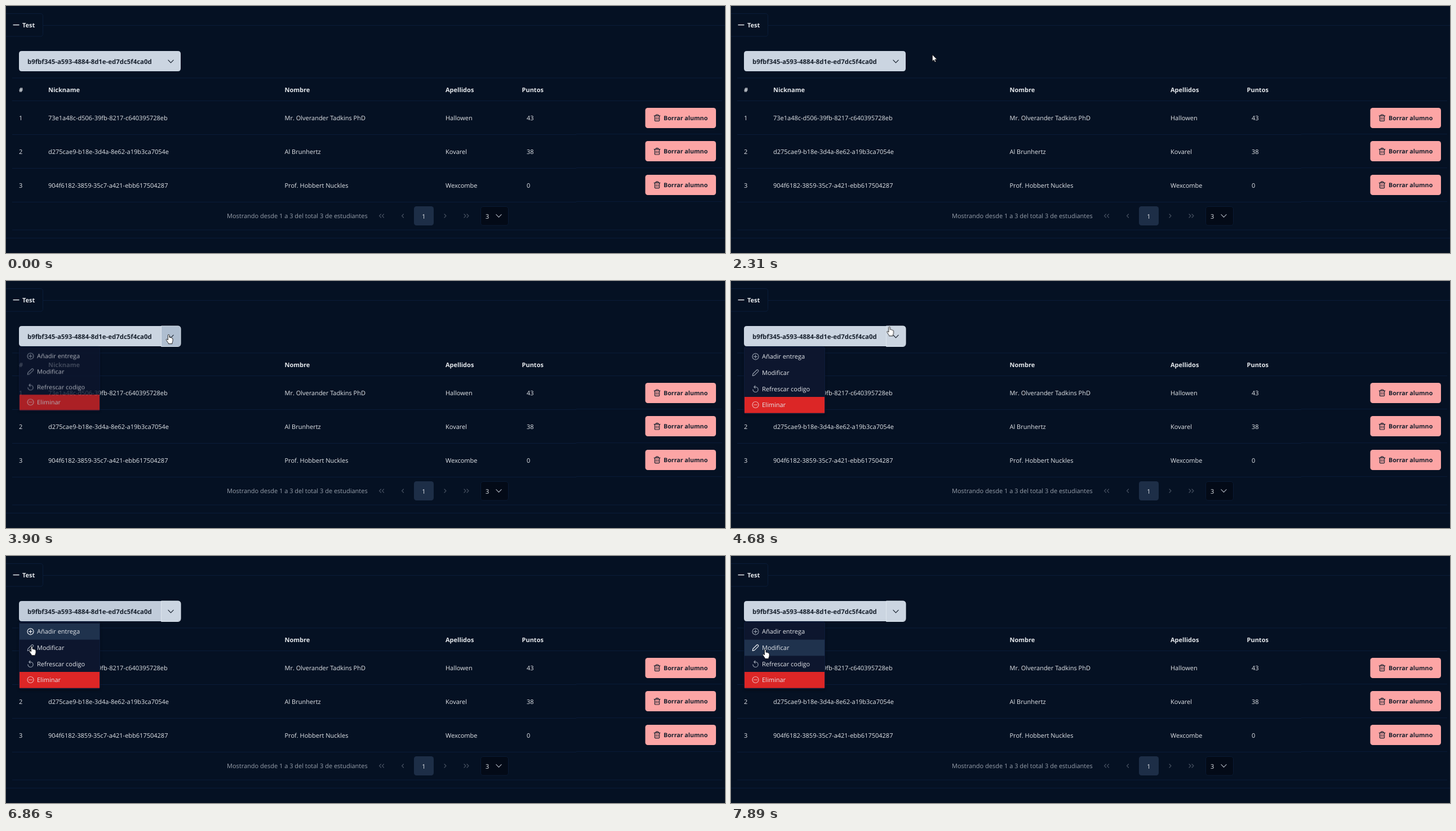
An HTML page for the animation above (7.99 s loop, 1276 by 439 pixels).

```html
<!DOCTYPE html>
<html lang="es">
<head>
<meta charset="utf-8">
<title>Test</title>
<style>
html, body { margin: 0; width: 100%; height: 100%; overflow: hidden; background: #051123; }
svg { display: block; width: 1276px; height: 439px; }
text { font: 11px "Open Sans", "Noto Sans", sans-serif; fill: #e4e7eb; text-rendering: geometricPrecision; white-space: pre; }
.b { font-weight: 700; }
.code { font-size: 11.4px; }
.action { font-size: 10.7px; }
.dark { fill: #17202d; }
.muted { fill: #979fab; }
.line { stroke: #0a1c39; fill: none; }
.icon { fill: none; stroke-width: 1.2; stroke-linecap: round; stroke-linejoin: round; }
.off { stroke: #465060; }
.ink { stroke: #17202d; }

.anim, .anim * { animation-duration: 7990ms; animation-iteration-count: infinite; animation-timing-function: linear; }
#cursor { animation-name: move; }
#arrow { animation-name: arrow; animation-timing-function: step-end; }
#hand { animation-name: hand; animation-timing-function: step-end; }
#ring { animation-name: ring; animation-timing-function: step-end; }
#main { animation-name: main; }
#drop { animation-name: drop; }
#menu { animation-name: menu; transform-origin: 95px 116px; }
#hi1 { animation-name: hi1; }
#hi2 { animation-name: hi2; }
#hi3 { animation-name: hi3; }

@keyframes move {
  0%, .25% { transform: translate(1268px, 434px); }
  2.5% { transform: translate(1120px, 370px); }
  5% { transform: translate(970px, 190px); }
  7.1% { transform: translate(870px, 50px); }
  9.64% { transform: translate(803px, 7px); }
  10.89% { transform: translate(757px, 8px); }
  15% { transform: translate(640px, 25px); }
  20.15% { transform: translate(487px, 65px); }
  25% { transform: translate(410px, 78px); }
  28.9% { transform: translate(357px, 86px); }
  31.04% { transform: translate(347px, 86px); }
  35% { transform: translate(325px, 89px); }
  38.8% { transform: translate(303px, 94px); }
  41.8%, 48.9% { transform: translate(289px, 95px); }
  51.8% { transform: translate(287px, 92px); }
  56.3% { transform: translate(276px, 84px); }
  61.8% { transform: translate(289px, 77px); }
  67.6% { transform: translate(245px, 73px); }
  72.6%, 73.8% { transform: translate(201px, 79px); }
  77.6% { transform: translate(130px, 95px); }
  82.6% { transform: translate(58px, 121px); }
  85.86% { transform: translate(46px, 160px); }
  89.5% { transform: translate(52px, 185px); }
  92.74% { transform: translate(60px, 183px); }
  96.4% { transform: translate(61px, 169px); }
  98.7%, 100% { transform: translate(61px, 166px); }
}
@keyframes arrow {
  0% { opacity: 0; }
  .25% { opacity: 1; }
  38.8% { opacity: 0; }
  59.5% { opacity: 1; }
  74% { opacity: 0; }
}
@keyframes hand {
  0% { opacity: 0; }
  38.8% { opacity: 1; }
  59.5% { opacity: 0; }
  74% { opacity: 1; }
}
@keyframes ring { 0% { opacity: 0; } 47.5%, 100% { opacity: 1; } }
@keyframes main {
  0%, 73.8% { fill: #cbd5e1; }
  76.3%, 83.5% { fill: #b2c0d0; }
  87.5%, 100% { fill: #cbd5e1; }
}
@keyframes drop {
  0%, 43% { fill: #cbd5e1; }
  45.5%, 49% { fill: #afbed0; }
  51.5%, 100% { fill: #cbd5e1; }
}
@keyframes menu {
  0%, 48.19% { opacity: 0; transform: scaleY(.8); animation-timing-function: cubic-bezier(0, 0, .2, 1); }
  49.69%, 100% { opacity: 1; transform: none; }
}
@keyframes hi1 {
  0%, 83.2% { opacity: 0; }
  84.5%, 86% { opacity: 1; }
  87.6%, 100% { opacity: 0; }
}
@keyframes hi2 {
  0%, 86% { opacity: 0; }
  87.6%, 88.6% { opacity: 1; }
  90.2%, 94% { opacity: 0; }
  96%, 100% { opacity: 1; }
}
@keyframes hi3 {
  0%, 88.6% { opacity: 0; }
  90.2%, 94% { opacity: 1; }
  96%, 100% { opacity: 0; }
}
</style>
</head>
<body>
<svg viewBox="0 0 1276 439" xmlns="http://www.w3.org/2000/svg">
  <defs>
    <path id="trash" class="icon ink" d="M-5.3-3.6H5.3M-4.1-3.6V4.6Q-4.1 5.7-3 5.7H3Q4.1 5.7 4.1 4.6V-3.6M-2.2-3.6V-4.8Q-2.2-5.7-1.3-5.7H1.3Q2.2-5.7 2.2-4.8V-3.6M-1.6-.8V3M1.6-.8V3"/>
    <path id="down" class="icon" d="M-4.6-2.3 0 2.3 4.6-2.3"/>
    <path id="left" class="icon" d="M1.5-3-1.5 0 1.5 3"/>
    <path id="plus" class="icon" d="M-5.5 0A5.5 5.5 0 1 1 5.5 0A5.5 5.5 0 1 1-5.5 0M-2.8 0H2.8M0-2.8V2.8"/>
    <path id="minus" class="icon" d="M-5.5 0A5.5 5.5 0 1 1 5.5 0A5.5 5.5 0 1 1-5.5 0M-2.8 0H2.8"/>
    <path id="pencil" class="icon" d="M-5.3 5.3-4.6 2 2.4-5Q3.4-5.8 4.4-4.9L4.9-4.4Q5.8-3.4 5-2.4L-2 4.6Z"/>
    <path id="refresh" class="icon" d="M-4.6 1.2A4.6 4.6 0 1 0 0-3.4H-2.4M-.6-5.6-2.8-3.4-.6-1.2"/>
    <filter id="shadow" x="-10%" y="-10%" width="120%" height="125%">
      <feDropShadow dx="0" dy="2" stdDeviation="2" flood-color="#000" flood-opacity=".35"/>
    </filter>
  </defs>

  <g class="line">
    <path d="M66 34.5H1276M0 412.5H1276"/>
    <path d="M0 13.5H61Q65.5 13.5 65.5 18V49.5Q65.5 54 61 54H0"/>
    <path d="M11 128H1271M11 168.5H1271M11 398H1271"/>
  </g>
  <path d="M12.5 33.6H23.5" stroke="#e4e7eb" stroke-width="1.5"/>
  <text class="b" x="29" y="38">Test</text>

  <text class="b" x="23" y="153">#</text>
  <text class="b" x="75" y="153">Nickname</text>
  <text class="b" x="494.5" y="153">Nombre</text>
  <text class="b" x="780" y="153">Apellidos</text>
  <text class="b" x="915.5" y="153">Puntos</text>
  <g id="rows"></g>

  <text class="muted" x="392" y="377">Mostrando desde 1 a 3 del total 3 de estudiantes</text>
  <g class="off">
    <use href="#left" x="664" y="373"/><use href="#left" x="669" y="373"/>
    <use href="#left" x="704" y="373"/>
    <use href="#left" transform="translate(779.5 373) scale(-1 1)"/>
    <use href="#left" transform="translate(814.5 373) scale(-1 1)"/>
    <use href="#left" transform="translate(819.5 373) scale(-1 1)"/>
  </g>
  <rect x="724" y="356" width="35" height="34" rx="4.5" fill="#1d2e47"/>
  <text x="741.5" y="377.5" text-anchor="middle">1</text>
  <rect x="842.5" y="356.5" width="49" height="33.5" rx="4.5" fill="#030a17" stroke="#0a1a33"/>
  <text x="851" y="378">3</text>
  <use href="#down" x="874.5" y="373" stroke="#aab2be"/>

  <g class="anim">
    <path id="main" d="M275 80V116H28Q23 116 23 111V85Q23 80 28 80Z"/>
    <path id="drop" d="M275 80H305Q310 80 310 85V111Q310 116 305 116H275Z"/>
    <path id="ring" d="M275.5 80H305Q310 80 310 85V111Q310 116.5 305 116.5H275.5Z" fill="none" stroke="#dde5ee"/>
    <text class="b dark code" x="38" y="102.5">b9fbf345-a593-4884-8d1e-ed7dc5f4ca0d</text>
    <use href="#down" class="ink" x="292.5" y="98.5"/>

    <g id="menu">
      <rect x="23.5" y="117" width="143" height="119" rx="3" fill="#07172f" stroke="#0a1c3a" filter="url(#shadow)"/>
      <rect x="24" y="206" width="142" height="28.7" fill="#dc2626"/>
      <g id="items"></g>
      <use href="#minus" x="43.5" y="220" stroke="#eeb0b0"/>
      <text x="55" y="224">Eliminar</text>
    </g>

    <g id="cursor">
      <path id="arrow" d="M.4.4V12.2L3.1 9.7 4.9 13.8 6.8 13 5 9H8.6Z" fill="#fff" stroke="#111" stroke-width=".8"/>
      <path id="hand" d="M-1.6 1.6Q-1.6.4-.3.4Q1 .4 1 1.6V5.2Q2.6 4.6 3.2 5.8Q4.7 5.2 5.2 6.5Q7 6.2 7 8V11.4Q7 13.2 5.9 14.4V16.6H-.8V15.4L-4.2 10.6Q-5.2 9-4.2 8.4Q-3.2 8-2.4 9L-1.6 10Z" fill="#fff" stroke="#111" stroke-width=".9"/>
    </g>
  </g>
</svg>
<script>
const students = [
  ["73e1a48c-d506-39fb-8217-c640395728eb", "Mr. Olverander Tadkins PhD", "Hallowen", 43],
  ["d275cae9-b18e-3d4a-8e62-a19b3ca7054e", "Al Brunhertz", "Kovarel", 38],
  ["904f6182-3859-35c7-a421-ebb617504287", "Prof. Hobbert Nuckles", "Wexcombe", 0]
];

document.getElementById("rows").innerHTML = students.map(([nick, name, surname, points], i) => {
  const y = 199 + 60 * i, mid = 198.7 + 59.6 * i;
  const cell = (x, s) => `<text x="${x}" y="${y + 4}">${s}</text>`;
  return cell(23, i + 1) + cell(75, nick) + cell(494.5, name) + cell(780, surname) + cell(924, points) +
    `<path class="line" d="M11 ${y + 29.5}H1012M1012 ${y + 28.7}H1271"/>
    <rect x="1134.5" y="${Math.round(mid - 18)}" width="125.5" height="36" rx="4.5" fill="#fca5a5"/>
    <use href="#trash" x="1155.5" y="${mid}"/>
    <text class="b dark action" x="1167" y="${mid + 4}">Borrar alumno</text>`;
}).join("");

const entries = [["plus", "Añadir entrega"], ["pencil", "Modificar"], ["refresh", "Refrescar codigo"]];
document.getElementById("items").innerHTML = entries.map(([icon, label], i) => {
  const top = 120 + 28.7 * i, mid = top + 14.3;
  const use = color => `<use href="#${icon}" x="43.5" y="${mid}" stroke="${color}"/>`;
  return use("#929ba9") +
    `<g id="hi${i + 1}"><rect x="24" y="${top}" width="142" height="28.7" fill="#1f324d"/>${use("#eef1f5")}</g>
    <text x="55" y="${mid + 4}">${label}</text>`;
}).join("");
</script>
</body>
</html>
```
